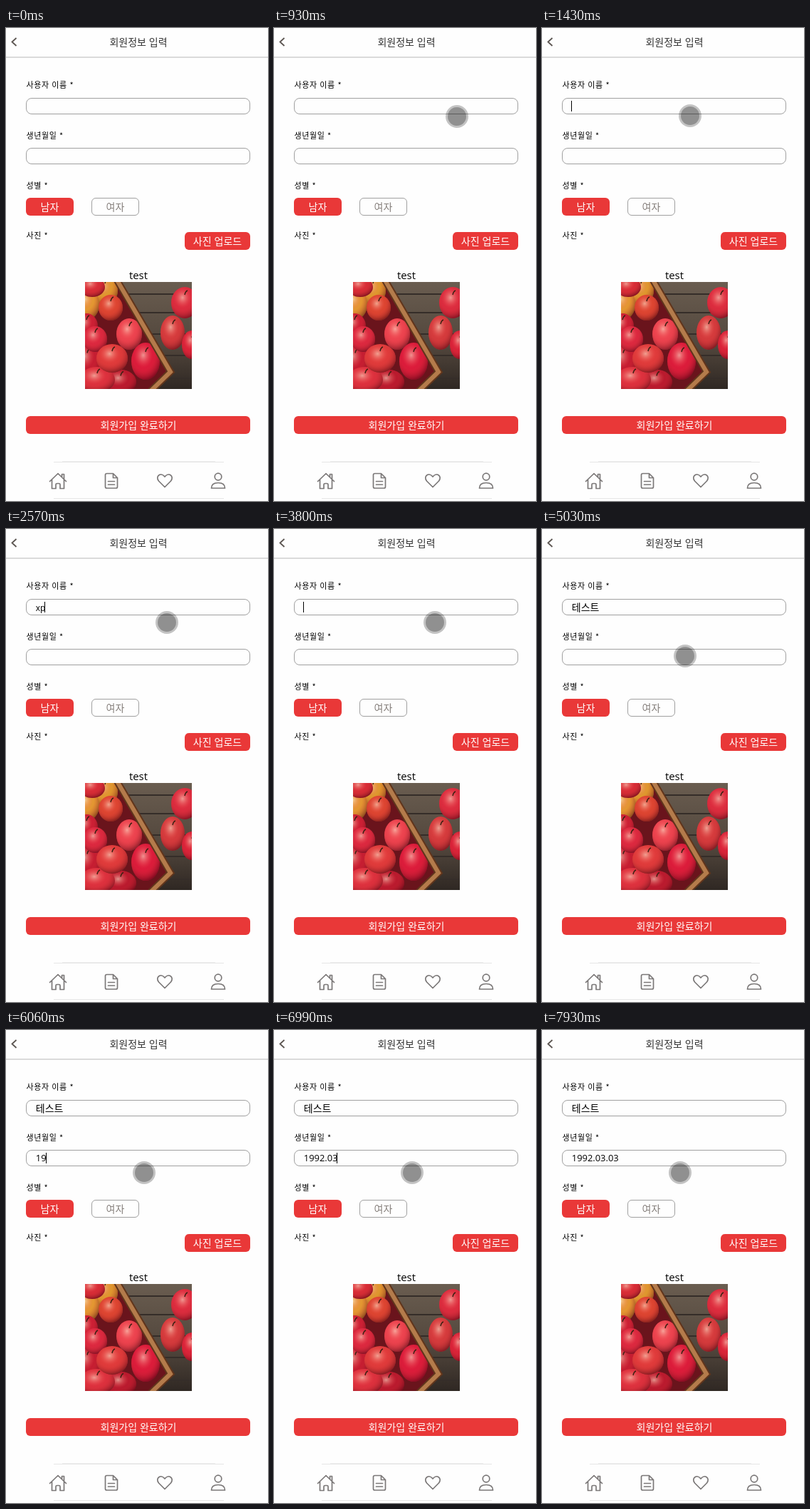
Animation, 368 px wide and 663 px high, one loop 8 s. Source, as an HTML page:

```html
<!DOCTYPE html>
<html lang="ko">
<head>
<meta charset="utf-8">
<title>회원정보 입력</title>
<style>
  html, body { margin: 0; width: 100%; height: 100%; overflow: hidden; background: #fefefe; }
  svg { display: block; width: 368px; height: 663px; }
  text { font: 14px "Noto Sans CJK KR", "Noto Sans CJK", sans-serif; white-space: pre; }
  .title { font-weight: 500; fill: #333; }
  .label { font-size: 11px; letter-spacing: .6px; }
  .latin { font-family: "Open Sans", sans-serif; }
  .mid { text-anchor: middle; }
  .on { fill: #fff; font-weight: 500; }
  .off { fill: #857f7b; }
  .box { fill: none; stroke: #a0a0a0; }
  .red { fill: #e93838; }
  .icon { fill: none; stroke: #7b7878; stroke-width: 1.7; stroke-linejoin: round; stroke-linecap: round; }
</style>
</head>
<body>
<svg viewBox="0 0 368 663">
  <defs>
    <clipPath id="frame"><rect width="150" height="150"/></clipPath>
    <radialGradient id="shade" cx=".42" cy=".34" r=".68">
      <stop offset="0" stop-color="#ffe6cc" stop-opacity=".6"/>
      <stop offset=".5" stop-color="#ff4040" stop-opacity=".08"/>
      <stop offset="1" stop-color="#38000c" stop-opacity=".55"/>
    </radialGradient>
    <linearGradient id="wood" x2="0" y2="1">
      <stop offset="0" stop-color="#6a5d50"/>
      <stop offset=".6" stop-color="#51463c"/>
      <stop offset="1" stop-color="#2f2823"/>
    </linearGradient>
  </defs>
  <rect width="368" height="663" fill="#fefefe"/>

  <path d="M14.500 14L8.500 19.500L14.500 25" fill="none" stroke="#5b5551" stroke-width="1.800"/>
  <text class="title mid" x="186" y="25">회원정보 입력</text>
  <rect y="40" width="368" height="2" fill="#dadada"/>

  <text class="label" x="28.500" y="84">사용자 이름 *</text>
  <rect class="box" x="28.500" y="98.500" width="314" height="22" rx="7.500"/>
  <text class="label" x="28.500" y="155">생년월일 *</text>
  <rect class="box" x="28.500" y="168.500" width="314" height="22" rx="7.500"/>

  <text class="label" x="28.500" y="225">성별 *</text>
  <rect class="red" x="28" y="238" width="67" height="25" rx="6"/>
  <text class="on mid" x="61.500" y="256">남자</text>
  <rect class="box" x="120.500" y="238.500" width="66" height="24" rx="5.500"/>
  <text class="off mid" x="153.500" y="256">여자</text>

  <text class="label" x="28.500" y="295">사진 *</text>
  <rect class="red" x="251" y="286" width="92" height="25" rx="6"/>
  <text class="on mid" x="297" y="304">사진 업로드</text>

  <text class="latin mid" x="186" y="352" style="font-size:15px">test</text>
  <g transform="translate(111 356)" clip-path="url(#frame)">
    <rect width="150" height="150" fill="url(#wood)"/>
    <path d="M55 17H150M70 43H150M86 73H150M104 103H150M112 135H150" stroke="#352d29" stroke-width="2"/>
    <path d="M0 0H43L122 124L96 150H0Z" fill="#6a141c"/>
    <g id="apples"></g>
    <path d="M44 -4L120 126L92 153" fill="none" stroke="#60351c" stroke-width="10"/>
    <path d="M44 -4L120 126L92 153" fill="none" stroke="#b47b4b" stroke-width="6"/>
  </g>

  <rect class="red" x="28" y="544" width="315" height="25" rx="6"/>
  <text class="on mid" x="186" y="562">회원가입 완료하기</text>

  <path d="M67 608.500H306M67 659.500H306" stroke="#e6e6e6"/>
  <path d="M79 607.500H294" stroke="#ededed"/>
  <g class="icon">
    <path d="M61.500 635.500L73 624.500L84.500 635.500M64.500 633V645.500H70V640Q70 638.500 71.500 638.500H74.500Q76 638.500 76 640V645.500H81.500V633M78.500 629V625.500H81.500V632"/>
    <path d="M141.500 624.500H150.500L156.500 630.500V643Q156.500 645 154.500 645H141.500Q139.500 645 139.500 643V626.500Q139.500 624.500 141.500 624.500ZM150.500 624.500V630.500H156.500M143.500 635.500H152.500M143.500 640H152.500"/>
    <path d="M223 643.500L214.500 635C209 628 218 622 223 629C228 622 237 628 231.500 635Z"/>
    <circle cx="298" cy="629" r="4.800"/>
    <path d="M288.500 645C288.500 639.500 292 637.500 298 637.500S307.500 639.500 307.500 645Z"/>
  </g>

  <text id="name" x="41.800" y="115"></text>
  <text id="birth" class="latin" x="41.800" y="184" style="font-size:12.900px"></text>
  <rect id="caret" width="1" height="15"/>
  <g id="pointer">
    <circle r="16" fill-opacity=".23"/>
    <circle r="13" fill-opacity=".26"/>
  </g>
</svg>
<script>
const LOOP = 8000;
const $ = id => document.getElementById(id);
const [nameText, birthText, caret, pointer] = ['name', 'birth', 'caret', 'pointer'].map($);

// x, y, rx, ry, colour
const apples = [
  [28, 12, 18, 20, '#dba02c'], [3, 31, 17, 22, '#e0a030'], [10, 7, 18, 14, '#d32a35'],
  [36, 36, 17, 18, '#d9452f'], [2, 62, 16, 18, '#c71c33'], [3, 112, 20, 25, '#c01a30'],
  [14, 80, 17, 18, '#d8263f'], [50, 140, 22, 17, '#b3162c'], [17, 137, 25, 18, '#d92f3d'],
  [38, 107, 22, 20, '#dc3a3a'], [62, 73, 18, 22, '#ea4350'], [85, 111, 20, 26, '#d8183a'],
  [140, 29, 19, 22, '#d82a3e'], [123, 71, 17, 24, '#d03a3c'], [150, 88, 14, 20, '#d62038']
];
$('apples').innerHTML = apples.map(([x, y, rx, ry, c]) =>
  [c, 'url(#shade)'].map(f => `<ellipse cx="${x}" cy="${y}" rx="${rx}" ry="${ry}" fill="${f}"/>`).join('') +
  `<path d="M${x} ${y - ry * .5}q1 -5 4 -6" fill="none" stroke="#3d2113" stroke-width="1.500"/>`
).join('');

// Each table holds [time, value...]; a value stays until the next row.
const moves = [
  [0, -50, -50], [730, 356, 397], [830, 303, 205], [930, 257, 124], [1030, 234, 120],
  [1130, 219, 119], [1230, 211, 120], [1330, 208, 122], [1430, 208, 123], [1530, 226, 131],
  [4730, 228, 134], [4830, 222, 149], [4930, 209, 167], [5030, 201, 178],
  [5130, 196, 190], [5230, 194, 198], [5330, 194, 200]
];
const names = [
  [0, ''], [2470, 'x'], [2570, 'xp'], [2670, 'xpt'], [2770, 'xptmx'], [2980, 'xptm'],
  [3190, 'xpt'], [3290, 'xp'], [3390, 'x'], [3490, ''],
  [3900, 'ㅌ'], [4000, '테'], [4100, '테스'], [4200, '테스트']
];
const BIRTH = '1992.03.03';
const births = [0, 5960, 6060, 6160, 6260, 6470, 6890, 6990, 7090, 7300, 7400]
  .map((t, i) => [t, BIRTH.slice(0, i)]);
const carets = [
  [0, null], [1330, nameText], [1840, null], [2260, nameText], [3590, null],
  [3800, nameText], [4730, null], [5330, birthText], [5860, null], [5960, birthText], [7930, null]
];

const at = (rows, t) => rows.findLast(r => r[0] <= t).slice(1);

function draw(t) {
  const [x, y] = at(moves, t);
  pointer.setAttribute('transform', `translate(${x} ${y})`);

  const [name] = at(names, t);
  const latin = /[a-z]/.test(name);
  nameText.textContent = name;
  nameText.classList.toggle('latin', latin);
  nameText.style.fontSize = latin ? '11.800px' : '14px';
  birthText.textContent = at(births, t)[0];

  const [field] = at(carets, t);
  caret.style.display = field ? '' : 'none';
  if (field) {
    const end = field.textContent ? field.getComputedTextLength() : 0;
    caret.setAttribute('x', Math.floor(41.3 + end));
    caret.setAttribute('y', field === nameText ? 102 : 172);
  }
}

const start = performance.now();
function tick() {
  draw((performance.now() - start) % LOOP);
  requestAnimationFrame(tick);
}
tick();
</script>
</body>
</html>
```
